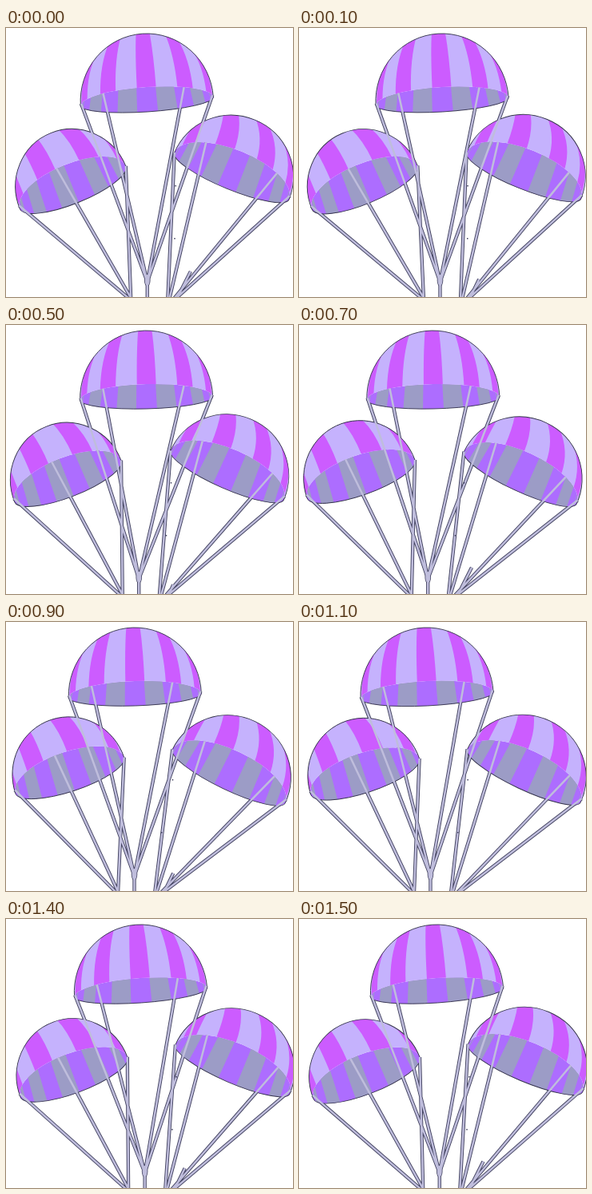
Write an HTML page with a canvas that moves like this. It is 359x337 px and loops after 1600 ms.

```html
<!DOCTYPE html>
<html>
<head>
<meta charset="utf-8">
<style>
html, body { margin: 0; width: 100%; height: 100%; overflow: hidden; background: #fff; }
canvas { display: block; }
</style>
</head>
<body>
<canvas id="stage" width="359" height="337"></canvas>
<script>
const ctx = document.getElementById('stage').getContext('2d');
const LOOP = 1600, STEP = 100, FLOOR = 340, RAD = Math.PI / 180;
const MAGENTA = '#cc5cff', LAVENDER = '#c5b2fd', PURPLE = '#ad6dff', GREY = '#9c9cc6';
const CORD = '#bfbddc', EDGE = '#40405e', OUTLINE = '#34344a';

// Bottom, depth and stripe layout of each canopy, in its own tilted frame.
// Angles are in degrees; the stripe tops sit at bottom * squeeze + lean.
const MID = { height: 85, front: 18, back: 13, pitch: 36, squeeze: 0.68, lean: 0, innerSpin: 18 };
const LEFT = { height: 73.5, front: 30, back: 20, pitch: 48, squeeze: 0.85, lean: -6, innerSpin: -9 };
const RIGHT = { height: 76, front: 33, back: 17, pitch: 42, squeeze: 0.7, lean: -11, innerSpin: 18 };

const clampAngle = deg => Math.max(-90, Math.min(90, deg));
const sin = deg => Math.sin(deg * RAD);
const cos = deg => Math.cos(deg * RAD);

// Places a canopy so that its rim runs from corner a to corner b.
function place(shape, a, b, spin) {
  const dx = b[0] - a[0], dy = b[1] - a[1];
  return {
    ...shape, spin,
    x: (a[0] + b[0]) / 2, y: (a[1] + b[1]) / 2,
    half: Math.hypot(dx, dy) / 2, angle: Math.atan2(dy, dx)
  };
}

// Point on the front rim, u running from -1 to 1.
function rimPoint(c, u) {
  const along = c.half * u, up = c.front * Math.sqrt(1 - u * u);
  const co = Math.cos(c.angle), si = Math.sin(c.angle);
  return [c.x + along * co + up * si, c.y + along * si - up * co];
}

function lens(c, top, bottom, flip) {
  ctx.beginPath();
  ctx.ellipse(0, 0, c.half, top, 0, Math.PI, 2 * Math.PI);
  ctx.ellipse(0, 0, c.half, bottom, 0, 0, Math.PI, flip);
  ctx.closePath();
}

function outerPanel(c, centre) {
  const low = deg => {
    const d = clampAngle(deg);
    return [c.half * sin(d), 1 - c.front * cos(d)];
  };
  const high = (deg, scale = 1.03) => {
    const d = clampAngle(clampAngle(deg) * c.squeeze + c.lean);
    return [c.half * scale * sin(d), -c.height * scale * cos(d)];
  };
  const bend = deg => {
    const [lx, ly] = low(deg), [hx, hy] = high(deg);
    return [lx + (hx - lx) * 0.12, ly + (hy - ly) * 0.6];
  };
  const from = centre - c.pitch * 0.22, to = centre + c.pitch * 0.24;
  ctx.moveTo(...low(from));
  ctx.quadraticCurveTo(...bend(from), ...high(from));
  ctx.lineTo(...high(centre, 1.1));
  ctx.lineTo(...high(to));
  ctx.quadraticCurveTo(...bend(to), ...low(to));
}

function innerPanel(c, centre) {
  const from = c.half * sin(clampAngle(centre - 9));
  const to = c.half * sin(clampAngle(centre + 9));
  ctx.moveTo(from * 0.92, -c.front);
  ctx.lineTo(to * 0.92, -c.front);
  ctx.lineTo(to, c.back);
  ctx.lineTo(from, c.back);
}

function fillStriped(c, base, stripe, spin, pitch, panel) {
  ctx.save();
  ctx.fillStyle = base;
  ctx.fill();
  ctx.clip();
  ctx.fillStyle = stripe;
  for (let k = -3; k <= 3; k++) {
    ctx.beginPath();
    panel(c, spin + k * pitch);
    ctx.fill();
  }
  ctx.restore();
}

function drawCanopy(c) {
  ctx.save();
  ctx.translate(c.x, c.y);
  ctx.rotate(c.angle);
  lens(c, c.front, c.back, false);
  fillStriped(c, PURPLE, GREY, c.innerSpin, 36, innerPanel);
  lens(c, c.height, c.front, true);
  fillStriped(c, LAVENDER, MAGENTA, c.spin, c.pitch, outerPanel);
  lens(c, c.height, c.back, false);
  ctx.strokeStyle = OUTLINE;
  ctx.lineWidth = 0.9;
  ctx.stroke();
  ctx.restore();
}

function drawCords(cords, color, width) {
  ctx.strokeStyle = color;
  ctx.lineWidth = width;
  ctx.beginPath();
  for (const [from, to] of cords) {
    ctx.moveTo(...from);
    ctx.lineTo(...to);
  }
  ctx.stroke();
}

function drawKnot([x, y], color, grow) {
  ctx.fillStyle = color;
  ctx.beginPath();
  ctx.ellipse(x, y - 2, 3 + grow, 7 + grow, 0, 0, 2 * Math.PI);
  ctx.fill();
}

function draw(t) {
  // Everything swings on one period; only size and peak time differ.
  const wave = (mean, size, peak, period = LOOP) =>
    mean + size * Math.cos(2 * Math.PI * (t - peak) / period);

  const midX = wave(170.2, 10.4, 240), tilt = wave(3.8, 2, 1450);
  const mid = place(MID, [midX - 83, 92 + tilt], [midX + 83, 92 - tilt], 0);
  const left = place(LEFT,
    [wave(14, 4, 1450), wave(221, 6.3, 120)],
    [wave(148, 4, 1320), wave(171, 2, 1500)], wave(22, 7, 200));
  const right = place(RIGHT,
    [wave(209, 3, 1360), wave(157.6, 2, 970)],
    [wave(351, 4, 1420), wave(220.3, 6.7, 950)], -17);

  const sway = wave(0, 8.3, 30);
  const knot = [168.5 + sway, 318];
  const foot = x => [x + sway, FLOOR];
  const hang = (c, u, end) => [rimPoint(c, u), end];
  const cords = [
    ...[-0.99, -0.65, 0.57, 0.99].map(u => hang(mid, u, knot)),
    [knot, foot(168.5)],
    hang(left, -0.99, foot(147)),
    hang(left, -0.14, foot(149)),
    hang(left, 1, foot(148)),
    hang(right, -1, foot(194)),
    hang(right, -0.59, foot(196)),
    hang(right, 0.66, foot(201)),
    hang(right, 0.99, foot(203))
  ];
  const rise = wave(17, 17, -60, LOOP / 2);
  cords.push([foot(205), [205 + sway + rise * 0.55, FLOOR - 3 - rise]]);

  ctx.fillStyle = '#fff';
  ctx.fillRect(0, 0, 359, 337);
  drawCords(cords, EDGE, 4.3);
  drawKnot(knot, EDGE, 0.8);
  [mid, left, right].forEach(drawCanopy);
  drawCords(cords, CORD, 2.5);
  drawKnot(knot, CORD, 0);

  ctx.fillStyle = EDGE;
  ctx.fillRect(right.x - 71, 197, 1.5, 1.5);
  ctx.fillRect(202 + sway, 263, 1.5, 1.5);
}

function frame() {
  draw(Math.floor(performance.now() / STEP) * STEP % LOOP);
  requestAnimationFrame(frame);
}
frame();
</script>
</body>
</html>
```
